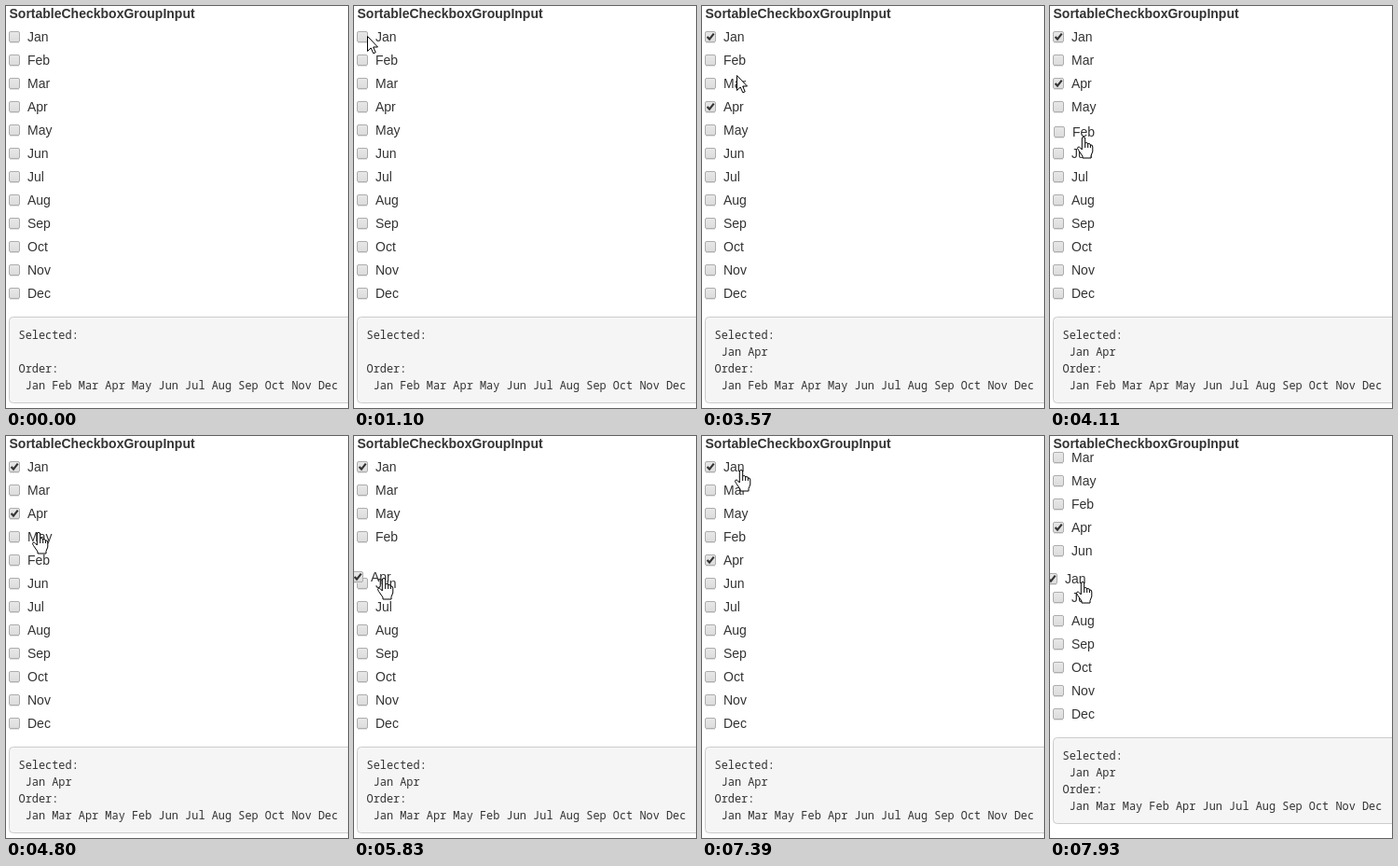
Animation of 367 by 431 pixels, one loop 8000 ms. Source, as an HTML page:

```html
<!DOCTYPE html>
<html lang="en">
<head>
<meta charset="utf-8">
<title>Sortable checkbox group</title>
<style>
  html, body { margin: 0; width: 100%; height: 100%; overflow: hidden; background: #fff; }
  svg { display: block; }
  text { font: 14px "Liberation Sans", Arial, sans-serif; fill: #333; white-space: pre; }
  .title { font-weight: bold; }
  .panel text { font: 11.917px "Noto Sans Mono", "DejaVu Sans Mono", monospace; }
  .panel rect { fill: #f5f5f5; stroke: #ccc; }
  .box { fill: url(#shade); stroke: #adadad; }
  .edge { stroke: #e2e2e2; }
  .tick { fill: none; stroke: #333; stroke-width: 2.2; }
  .pointer path { fill: #fff; stroke: #000; stroke-linejoin: round; }
</style>
</head>
<body>
<svg width="367" height="431" viewBox="0 0 367 431">
  <defs>
    <linearGradient id="shade" x2="0" y2="1">
      <stop stop-color="#e8e8e8"/><stop offset="1" stop-color="#dcdcdc"/>
    </linearGradient>
  </defs>
  <text class="title" x="3.5" y="13">SortableCheckboxGroupInput</text>
  <g class="panel" id="panel">
    <rect x="3.5" y="333.5" width="380" height="92" rx="4"/>
    <text x="13.5" y="357">Selected:</text>
    <text x="20.65" y="375" id="selected"></text>
    <text x="13.5" y="393">Order:</text>
    <text x="20.65" y="411" id="order"></text>
  </g>
  <g id="rows"></g>
  <g class="pointer" id="pointer">
    <path id="arrow" d="M.5.5V16.5L4.2 13L6.8 18.8L9.2 17.8L6.7 12H11.5Z"/>
    <path id="hand" d="M-1.7 14V2Q-1.7.5 0 .5T1.7 2V7.5Q2 6.5 3.2 6.5T4.7 8Q5 7.5 6 7.5T7.4 9Q9.8 8.5 9.8 11V16L8 20.5V23H-1V21L-5.5 14.5Q-7.3 12-6 11.3T-3.5 12ZM1.7 7.5V12M4.7 8V12M7.4 9V12"/>
  </g>
</svg>
<script>
const LOOP = 8000, TICK = 77;
const TOP = 33, PITCH = 25, FIRST_MARGIN = 10, DROP_SLOT = 4;
const CLICK = 150, LIFT_DELAY = 140, REPORT_DELAY = 70;
const months = 'Jan Feb Mar Apr May Jun Jul Aug Sep Oct Nov Dec'.split(' ');

// Pointer moves: start, end, then the x and y reached
const entry = { x: 295, y: 401 };
const moves = [
  [70, 780, 28, 34], [950, 1100, 14, 32],
  [1570, 2190, 12.5, 107],
  [2640, 3100, 35, 63],
  [3500, 3570, 37, 74], [3570, 4110, 36, 140],
  [4490, 4800, 35, 103], [4800, 5030, 37, 89], [5200, 5270, 37, 84],
  [5440, 5830, 32, 152], [5980, 6150, 48, 143], [6310, 6380, 45, 137],
  [6540, 7160, 42, 36],
  [7390, 7930, 35, 156]
];
const clicks = [{ month: 'Jan', press: 1330 }, { month: 'Apr', press: 2420 }];
const drags = [
  { month: 'Feb', press: 3500, drop: 4490 },
  { month: 'Apr', press: 5440, drop: 6540 },
  { month: 'Jan', press: 7390, drop: LOOP }
];

const $ = id => document.getElementById(id);
const show = (el, on) => el.setAttribute('visibility', on ? 'visible' : 'hidden');
const put = (el, x, y) => el.setAttribute('transform', `translate(${x} ${y})`);
const ease = k => k * k * (3 - 2 * k);

const rows = {};
for (const month of months) {
  const row = document.createElementNS('http://www.w3.org/2000/svg', 'g');
  row.innerHTML = `<rect class="box" x="3.5" y="-5.5" width="11" height="11" rx="1.5"/>
    <path class="edge" d="M4 6.5H14"/>
    <path class="tick" d="M5.6 0L8 2.6L12.7-3.4"/>
    <text x="23" y="5">${month}</text>`;
  $('rows').append(row);
  rows[month] = row;
}

function pointerAt(t) {
  let { x, y } = entry;
  for (const [start, end, toX, toY] of moves) {
    if (t < start) break;
    // The picture advances in whole ticks, spread evenly over the move
    const steps = Math.round((end - start) / TICK);
    const k = ease(Math.min(1, Math.floor((t - start) / (end - start) * steps + 0.1) / steps));
    x += (toX - x) * k;
    y += (toY - y) * k;
  }
  return { x: Math.round(x), y: Math.round(y) };
}

function reorder(order, month, slot) {
  const rest = order.filter(m => m !== month);
  rest.splice(slot, 0, month);
  return rest;
}

function overLabel({ x, y }) {
  const row = Math.round((y - TOP) / PITCH);
  return x > 16 && x < 50 && row >= 0 && row < months.length
    && Math.abs(y - TOP - row * PITCH) < 9;
}

function draw(t) {
  const pointer = pointerAt(t);
  let order = months, reported = months, held = null, shift = 0;

  for (const { month, press, drop } of drags) {
    if (t < press + LIFT_DELAY) break;
    if (t >= drop) {
      order = reorder(order, month, DROP_SLOT);
      if (t >= drop + REPORT_DELAY) reported = order;
      continue;
    }
    const grab = pointerAt(press), from = order.indexOf(month);
    // Lifting the first row removes its top margin
    if (from === 0) shift = -FIRST_MARGIN;
    const y = TOP + from * PITCH + pointer.y - grab.y;
    held = { row: rows[month], x: pointer.x - grab.x, y };
    order = reorder(order, month, Math.max(from, Math.floor((y - TOP - shift) / PITCH)));
  }

  order.forEach((month, i) => {
    const click = clicks.find(c => c.month === month);
    const since = click ? t - click.press : -1;
    put(rows[month], 0, TOP + shift + i * PITCH);
    show(rows[month].querySelector('.tick'), since >= CLICK);
    show(rows[month].querySelector('.edge'), since < 0 || since >= CLICK);
  });
  if (held) {
    put(held.row, held.x, held.y);
    if (held.row.nextSibling) $('rows').append(held.row);
  }

  const isSelected = m => clicks.some(c => c.month === m && t >= c.press + CLICK + REPORT_DELAY);
  $('selected').textContent = reported.filter(isSelected).join(' ');
  $('order').textContent = reported.join(' ');
  put($('panel'), 0, shift);

  const present = t >= moves[0][0], hand = held || overLabel(pointer);
  show($('hand'), present && hand);
  show($('arrow'), present && !hand);
  put($('pointer'), pointer.x, pointer.y);
}

const began = performance.now();
function frame() {
  draw((performance.now() - began) % LOOP);
  requestAnimationFrame(frame);
}
frame();
</script>
</body>
</html>
```
